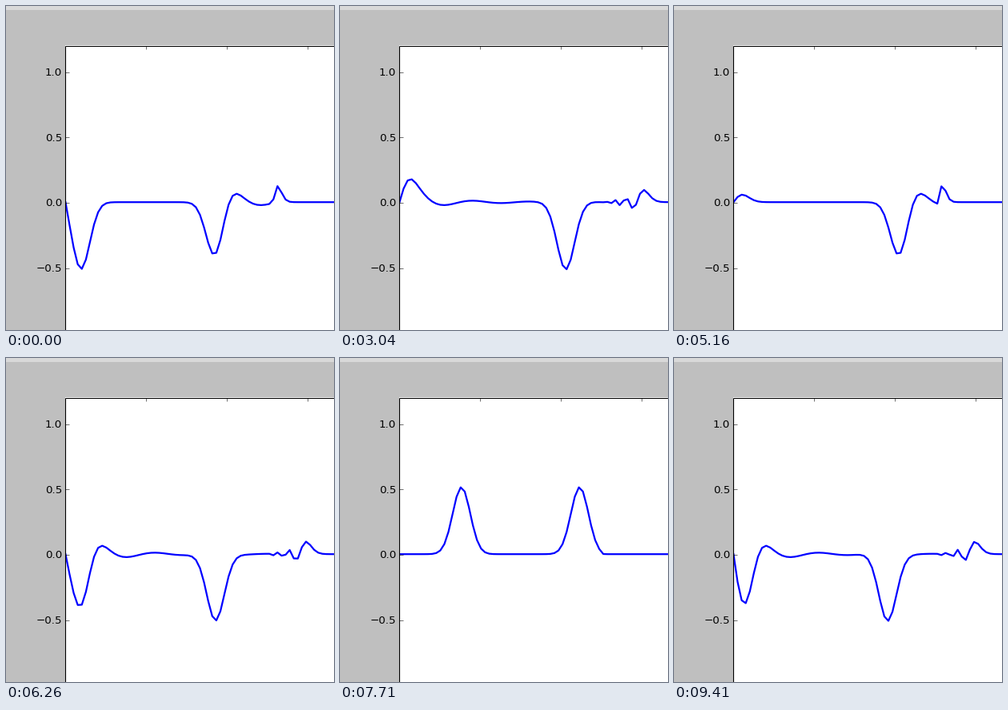
A matplotlib script for the animation above (9.44 s loop, 410x405 px).

```python
import numpy as np
import matplotlib.pyplot as plt
from matplotlib.animation import FuncAnimation
from matplotlib.patches import Rectangle

WIDTH, HEIGHT, DPI = 410, 405, 80
TICK_MS, LOOP_MS = 20, 9440
NODES, CYCLE = 100, 100
LEFT, SPAN = 74.4, 504.4        # pixel place of x = 0 and length of the x axis
ZERO, UNIT = 245.2, 163.3       # pixel row of y = 0 and height of one unit
TOP = ZERO - 1.2 * UNIT

# (first ms, last ms, number of redraws, first step, last step)
BURSTS = [
    (0, 0, 1, 34, 34),
    (460, 560, 3, 36, 40),
    (830, 1030, 5, 41, 47),
    (1280, 1490, 5, 48, 55),
    (1740, 1930, 5, 56, 62),
    (2190, 2420, 5, 63, 70),
    (3040, 3040, 1, 71, 71),
    (3110, 3950, 18, 73, 101),
    (3990, 4120, 4, 102, 106),
    (4350, 4660, 7, 7, 17),
    (4800, 5110, 8, 18, 28),
    (5160, 5710, 12, 30, 49),
    (5760, 6210, 10, 51, 65),
    (6260, 6630, 9, 67, 79),
    (6730, 7660, 20, 82, 113),
    (7710, 8620, 17, 15, 42),
    (8670, 9410, 17, 44, 68),
]


def simulate():
    """Wave equation on a string whose right half is much slower."""
    x = np.linspace(0, 1, NODES)
    courant2 = np.where(x < 0.5, 1.0, 0.05)[1:-1]
    pulse = np.exp(-1000 * (x - 0.3) ** 2)
    pulse[0] = pulse[-1] = 0
    history = [pulse, pulse]
    while len(history) < CYCLE:
        old, now = history[-2:]
        new = np.zeros(NODES)
        bend = now[2:] - 2 * now[1:-1] + now[:-2]
        new[1:-1] = 2 * now[1:-1] - old[1:-1] + courant2 * bend
        history.append(new)
    return LEFT + SPAN * x, ZERO - UNIT * np.array(history)


def schedule():
    """Simulation step on show at every tick of the loop."""
    shown = np.zeros(LOOP_MS // TICK_MS, dtype=int)
    for t0, t1, count, s0, s1 in BURSTS:
        times = np.linspace(t0, t1, count)
        steps = np.linspace(s0, s1, count)
        for t, step in zip(times, steps):
            shown[int(t / TICK_MS):] = int(step) % CYCLE
    return shown


xs, waves = simulate()
shown = schedule()

fig = plt.figure(figsize=(WIDTH / DPI, HEIGHT / DPI), dpi=DPI,
                 facecolor="#bfbfbf")
ax = fig.add_axes([0, 0, 1, 1])
ax.set_xlim(0, WIDTH)
ax.set_ylim(HEIGHT, 0)
ax.axis("off")


def stroke(x, y, width):
    # the small shift keeps horizontal lines on their pixel row
    ax.plot(x, np.add(y, 0.8), color="black", lw=width, zorder=3,
            solid_capstyle="butt")


ax.add_patch(Rectangle((0, 0), WIDTH, 5, color="#d9d9d9", lw=0))
panel = Rectangle((LEFT, TOP), SPAN, HEIGHT, facecolor="white", lw=0)
ax.add_patch(panel)

stroke([LEFT, LEFT], [TOP, HEIGHT + 5], 1)
stroke([LEFT, WIDTH + 5], [TOP, TOP], 1)
for k in (1, 2, 3):
    tick_x = LEFT + SPAN * k / 5
    stroke([tick_x, tick_x], [TOP, TOP + 4.4], 0.5)
for value in (1.0, 0.5, 0.0, -0.5, -1.0):
    row = ZERO - UNIT * value
    stroke([LEFT, LEFT + 4.4], [row, row], 0.5)
    label = f"{value:.1f}".replace("-", "\u2212")
    ax.text(LEFT - 4.2, row + 5, label, ha="right", va="baseline",
            family="DejaVu Sans", size=12, color="black", clip_on=True)

curve, = ax.plot(xs, waves[shown[0]], color="#0000ff", lw=2, zorder=2)
curve.set_clip_path(panel)


def draw(tick):
    curve.set_ydata(waves[shown[tick]])
    return curve,


anim = FuncAnimation(fig, draw, frames=len(shown), interval=TICK_MS,
                     repeat=True, repeat_delay=0)
plt.show()
```
